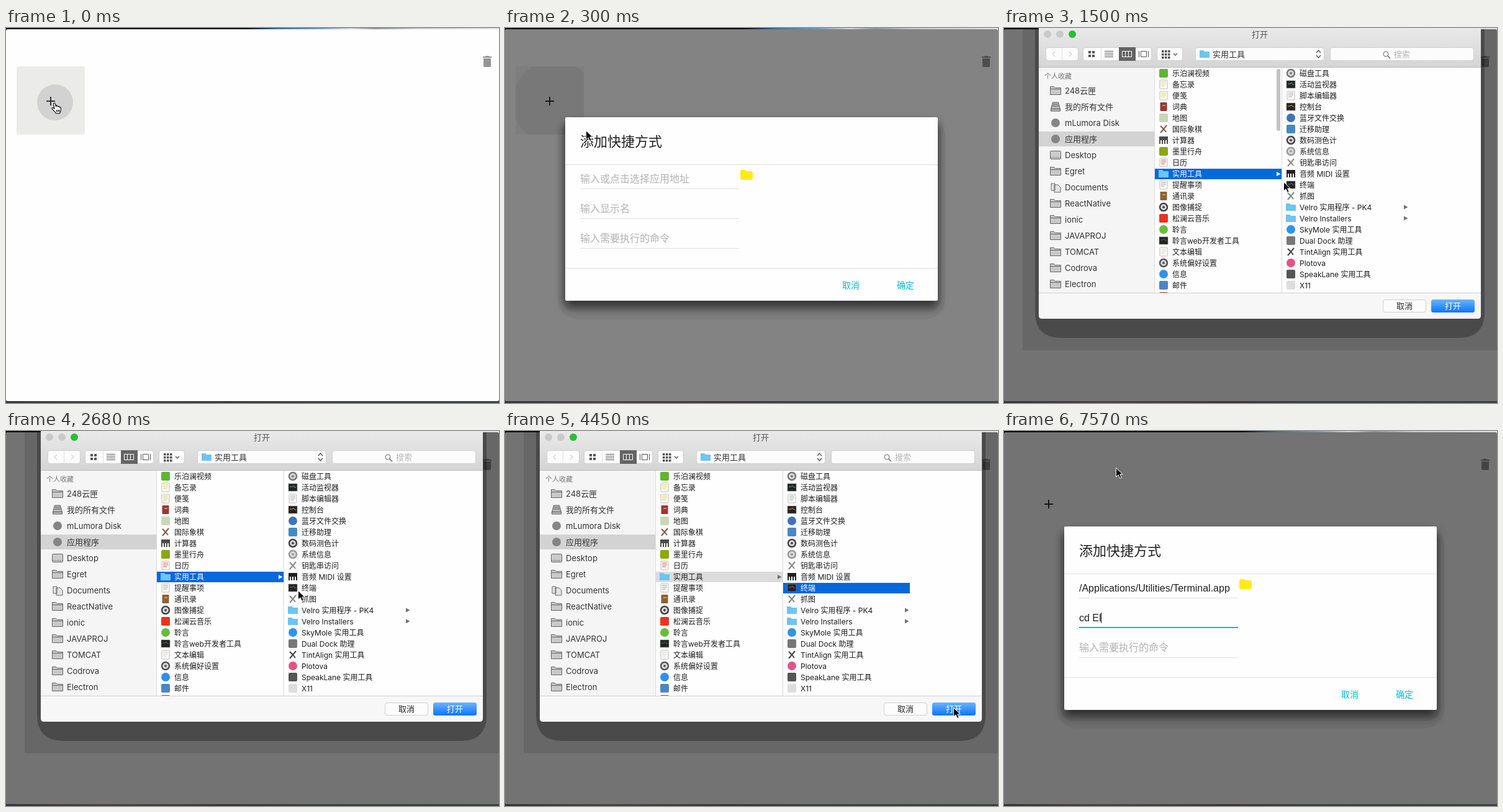
An HTML page that plays this animation: 794 px wide and 605 px high, repeating every 8000 ms.

```html
<!DOCTYPE html>
<html lang="zh-CN">
<head>
<meta charset="utf-8">
<title>添加快捷方式</title>
<style>
  html, body { margin: 0; width: 100%; height: 100%; overflow: hidden; background: #000; }
  svg { display: block; }
  text { font-family: Inter, "Noto Sans CJK SC", "Noto Sans CJK", sans-serif; white-space: pre; }
  .field { font: 16px "Liberation Sans", Arial, sans-serif; fill: #212121; }
  .hint { font-size: 16px; font-weight: 300; fill: #b2b2b2; }
  .mid { text-anchor: middle; }
</style>
</head>
<body>
<svg id="stage" width="794" height="605" viewBox="0 0 794 605">
  <defs>
    <linearGradient id="sky">
      <stop offset=".48" stop-color="#000"/><stop offset=".55" stop-color="#3f6896"/>
      <stop offset=".64" stop-color="#7d9cc0"/><stop offset=".7" stop-color="#d5d7da"/>
      <stop offset=".75" stop-color="#8d9298"/><stop offset=".83" stop-color="#c9cbce"/>
      <stop offset="1" stop-color="#e2e3e5"/>
    </linearGradient>
    <linearGradient id="ground">
      <stop offset="0" stop-color="#33343a"/><stop offset=".2" stop-color="#4a4145"/>
      <stop offset=".45" stop-color="#3b3539"/><stop offset=".6" stop-color="#3a3d42"/>
      <stop offset="1" stop-color="#3c3f43"/>
    </linearGradient>
    <linearGradient id="bar" x2="0" y2="1">
      <stop offset="0" stop-color="#e9e9e9"/><stop offset="1" stop-color="#d5d5d5"/>
    </linearGradient>
    <linearGradient id="blue" x2="0" y2="1">
      <stop offset="0" stop-color="#6ab4fb"/><stop offset="1" stop-color="#0c74fd"/>
    </linearGradient>
    <clipPath id="tileClip"><rect x="17" y="62" width="110" height="110" rx="2"/></clipPath>
    <clipPath id="listClip"><rect x="56" y="64" width="712" height="363"/></clipPath>
    <filter id="soft" x="-20%" y="-30%" width="140%" height="160%"><feGaussianBlur stdDeviation="8"/></filter>
  </defs>

  <rect width="794" height="4" fill="url(#sky)"/>
  <rect y="598" width="794" height="7" fill="url(#ground)"/>
  <rect y="2" width="794" height="600" rx="3" fill="#fefefe"/>

  <g id="tile" clip-path="url(#tileClip)">
    <rect x="17" y="62" width="110" height="110" fill="#ebebe9"/>
    <circle id="ripple" cx="79" cy="120" fill="#d2d2d2"/>
  </g>
  <path transform="translate(60 106)" d="M19 13h-6v6h-2v-6H5v-2h6V5h2v6h6v2z" fill="#333"/>
  <path transform="translate(763 42)" d="M6 19c0 1.1.9 2 2 2h8c1.1 0 2-.9 2-2V7H6v12zM19 4h-3.5l-1-1h-5l-1 1H5v2h14V4z" fill="#969696"/>
  <rect id="shade" y="2" width="794" height="600" rx="3"/>

  <g id="dialog">
    <rect x="-12" y="-2" width="624" height="328" rx="32" opacity=".045"/>
    <rect x="-6" y="4" width="612" height="310" rx="22" opacity=".06"/>
    <rect y="10" width="600" height="296" filter="url(#soft)" opacity=".6"/>
    <rect width="600" height="296" rx="2" fill="#fefefe"/>
    <path d="M0 76.5H600M0 243.5H600M24 115.5H280M24 163.5H280M24 211.5H280" stroke="#e0e0e0"/>
    <text x="24" y="47" font-size="22" font-weight="300" fill="#212121">添加快捷方式</text>
    <text id="pathHint" class="hint" x="24" y="105">输入或点击选择应用地址</text>
    <text id="path" class="field" x="24" y="105">/Applications/Utilities/Terminal.app</text>
    <text id="nameHint" class="hint" x="24" y="153">输入显示名</text>
    <text id="name" class="field" x="24" y="153"></text>
    <text class="hint" x="24" y="201">输入需要执行的命令</text>
    <rect id="focus" y="162" height="2" fill="#00bcd4"/>
    <rect id="caret" y="139" width="1" height="17" fill="#111"/>
    <path transform="translate(280 81)" d="M10 4H4c-1.1 0-1.99.9-1.99 2L2 18c0 1.1.9 2 2 2h16c1.1 0 2-.9 2-2V8c0-1.1-.9-2-2-2h-8l-2-2z" fill="#ffeb17"/>
    <rect id="hover" x="504" y="252" width="88" height="36" rx="2" fill="#ebebeb"/>
    <g font-size="14" fill="#00bcd4" class="mid">
      <text x="460" y="276">取消</text><text x="548" y="276">确定</text>
    </g>
  </g>

  <g id="sheet"></g>

  <g id="cursor">
    <path id="arrow" d="M.5 .5V15L4 11.8 6.6 17.4 9.2 16.2 6.7 10.9H11.2Z" fill="#000" stroke="#fff" stroke-width="1"/>
    <g id="hand" stroke="#000" stroke-width="1.1" stroke-linejoin="round">
      <path d="M1.5 2C1-.2 3.6-.8 4.3 1.3L5.6 6C6-.0 6 5 6.6 4.8 8 4.2 8.6 5 8.8 6.2 9.6 5.2 11 5.6 11.2 6.9 12.4 6.2 13.4 7 13.4 8.4L13.2 12 11.6 16.8H5.4C4.5 14.2 1.2 11.8-.6 9.6-1.6 8 .2 6.8 1.6 8.2L3 9.4Z" fill="#fff"/>
      <path d="M6.4 11v3.4M8.6 11v3.4M10.7 11v3.4" fill="none"/>
    </g>
    <path id="beam" d="M-3.5-8.5Q-.5-8.5 0-6.5 .5-8.5 3.5-8.5M0-6.5V6.5M-3.5 8.5Q-.5 8.5 0 6.5 .5 8.5 3.5 8.5M-2 2.5H2" fill="none" stroke="#000" stroke-width="1.2"/>
  </g>
</svg>
<script>
const $ = id => document.getElementById(id);
const show = (id, on) => { $(id).style.display = on ? '' : 'none'; };
const set = (id, attrs) => { for (const k in attrs) $(id).setAttribute(k, attrs[k]); };

// ---- file sheet ----
const rect = (x, y, w, h, fill, more = '') => `<rect x="${x}" y="${y}" width="${w}" height="${h}" fill="${fill}" ${more}/>`;
const line = (d, stroke, more = '') => `<path d="${d}" fill="none" stroke="${stroke}" ${more}/>`;
const label = (x, y, size, fill, s, more = '') => `<text x="${x}" y="${y}" font-size="${size}" fill="${fill}" ${more}>${s}</text>`;
const button = (x, w, y = 31, h = 22) => rect(x + .5, y + .5, w - 1, h - 1, '#fcfcfc', 'rx="3.5" stroke="#cfcfcf"');

// Small row icons centred on x, y.
const icons = {
  sq: (x, y, c) => rect(x - 7, y - 7, 14, 14, c, 'rx="2"'),
  dot: (x, y, c) => `<circle cx="${x}" cy="${y}" r="7" fill="${c}"/>`,
  screen: (x, y, c) => rect(x - 7, y - 6, 14, 12, '#222', 'stroke="#888" stroke-width=".6"') + line(`M${x - 5} ${y - 1}h4l2-2 2 3h2`, c),
  page: (x, y, c) => rect(x - 6, y - 7, 12, 14, '#fcfcfa', 'rx="1" stroke="#aaa" stroke-width=".8"') + line(`M${x - 4} ${y - 4}h8M${x - 4} ${y - 1}h8M${x - 4} ${y + 2}h6`, c),
  book: (x, y, c) => rect(x - 5.5, y - 7, 11, 14, c, 'rx="1"') + line(`M${x - 2} ${y - 2}h5`, '#e6d6bd'),
  ring: (x, y, c) => `<circle cx="${x}" cy="${y}" r="6" fill="#ddd" stroke="${c}" stroke-width="2.5"/><circle cx="${x}" cy="${y}" r="2" fill="${c}"/>`,
  tool: (x, y, c) => line(`M${x - 5} ${y + 6}L${x + 5} ${y - 6}M${x - 5} ${y - 5}l5 5 4 5`, c, 'stroke-width="2"'),
  keys: (x, y, c) => rect(x - 7, y - 6, 14, 12, c) + line(`M${x - 4} ${y}v6M${x} ${y}v6M${x + 4} ${y}v6`, '#fff', 'stroke-width="2"'),
  folder: (x, y, c) => `<path d="M${x - 8} ${y + 6}v-12h6l2 2h8v10z" fill="${c}"/>`,
  side: (x, y) => `<path d="M${x - 8.5} ${y + 6.5}v-13h6l2 2h9v11z" fill="#c9c9c9" stroke="#666"/>` + line(`M${x - 8} ${y - 2.5}h16`, '#666'),
  tray: (x, y) => `<path d="M${x - 7.5} ${y + 7}v-3l3-11h9l3 11v3z" fill="#bbb" stroke="#555"/>` + line(`M${x - 4} ${y - 4}h8M${x - 5} ${y - 1}h10M${x - 7} ${y + 3.5}h14`, '#555'),
  desk: (x, y) => rect(x - 8.5, y - 6.5, 17, 13, '#ccc', 'rx="1" stroke="#666"') + line(`M${x - 8} ${y + 4}h16`, '#666', 'stroke-dasharray="2 1"'),
  docs: (x, y) => `<path d="M${x - 7} ${y + 5}v-11h6v11z M${x - 2} ${y + 8}v-12h6l4 4v8z" fill="#e4e4e4" stroke="#666"/>`
};

const places = ['248云匣', '我的所有文件|tray', 'mLumora Disk|dot', '应用程序|dot', 'Desktop|desk', 'Egret', 'Documents|docs',
  'ReactNative', 'ionic', 'JAVAPROJ', 'TOMCAT', 'Codrova', 'Electron'];
const apps = ['乐泊澜视频|sq|#5fb62f', '备忘录|page|#edc84b', '便笺|page|#e3c13d', '词典|book|#98382f', '地图|sq|#c9d7b9',
  '国际象棋|tool|#7c5b43', '计算器|keys|#4a4a4a', '墨里行舟|sq|#8aa80f', '日历|page|#e2463c', '实用工具|folder|#6fc4f1',
  '提醒事项|page|#999', '通讯录|book|#8e6233', '图像捕捉|ring|#454545', '松澜云音乐|sq|#e8351f', '聆言|dot|#68bd3c',
  '聆言web开发者工具|screen|#3d7a55', '文本编辑|page|#ccc', '系统偏好设置|ring|#555', '信息|dot|#2f90ee', '邮件|sq|#4c86c2', '|sq|#e33b26'];
const tools = ['磁盘工具|ring|#777', '活动监视器|screen|#58b9a0', '脚本编辑器|page|#999', '控制台|screen|#d8a52e', '蓝牙文件交换|dot|#3e74b8',
  '迁移助理|sq|#4789c5', '数码测色计|ring|#444', '系统信息|ring|#999', '钥匙串访问|tool|#888', '音频 MIDI 设置|keys|#222', '终端|screen|#777',
  '抓图|tool|#7b8a80', 'Velro 实用程序 - PK4|folder|#6fc4f1', 'Velro Installers|folder|#6fc4f1', 'SkyMole 实用工具|dot|#2f94ea',
  'Dual Dock 助理|sq|#777', 'TintAlign 实用工具|tool|#444', 'Plotova|dot|#e5528a', 'SpeakLane 实用工具|sq|#555', 'X11|sq|#ddd'];

const column = (rows, x, id) => rows.map((row, i) => {
  const [name, kind, color] = row.split('|'), y = 73 + 18 * i;
  return icons[kind](x, i === 20 ? 433 : y, color) + label(x + 14, y + 4.5, 12, '#1c1c1c', name, `id="${id}${i}"`);
}).join('');
const triangle = (x, y, id = '') => `<path ${id} d="M${x} ${y - 3.5}l6.5 3.5-6.5 3.5z" fill="#707070"/>`;

const sidebar = places.map((row, i) => {
  const [name, kind = 'side'] = row.split('|'), y = 101 + 26 * i;
  return icons[kind](83, y, '#858585') + label(98, y + 4.8, 13, '#333', name);
}).join('');

const dots = (x, y, cols, rows, gap, size) => {
  let s = '';
  for (let i = 0; i < cols * rows; i++) s += rect(x + i % cols * gap, y + (i / cols | 0) * gap, size, size, '#555');
  return s;
};

$('sheet').innerHTML =
  rect(30, 2, 764, 518, '#000', 'opacity=".1"') +
  `<path d="M50 2H774V458Q774 500 732 500H92Q50 500 50 458Z" opacity=".28"/>` +
  `<path d="M56 0H768V464Q768 469 763 469H61Q56 469 56 464Z" fill="#f7f7f7"/>` +
  rect(56, 0, 712, 63, 'url(#bar)') + line('M56 63.5H768', '#bcbcbc') +
  [['70', '#c9c9c9'], ['90', '#c9c9c9'], ['110', '#26c035']].map(([x, c]) => `<circle cx="${x}" cy="10" r="6" fill="${c}"/>`).join('') +
  label(412, 15, 13, '#555', '打开', 'class="mid"') +
  button(67, 53) + line('M93.5 32V52', '#ddd') + line('M82 38l-4 4 4 4M105 38l4 4-4 4', '#bbb') +
  button(127, 111) + rect(185, 31, 27, 22, '#646464') + line('M156.5 32V52', '#ddd') +
  dots(136, 37, 2, 2, 6, 4) + line('M162 37.5h14M162 40.5h14M162 43.5h14M162 46.5h14', '#555') +
  line('M190.5 37.5h15v9h-15zM195.5 37.5v9M200.5 37.5v9', '#fff') +
  line('M220.5 37.5h9v9h-9zM217.5 37v10M232.5 37v10', '#555') +
  button(246, 42) + dots(254, 36, 3, 3, 5, 3.5) + line('M273 41l3 3 3-3', '#555', 'stroke-width="1.3"') +
  button(308, 208) + icons.folder(323, 42, '#6fc4f1') + label(336, 47, 13, '#333', '实用工具') +
  line('M503 40l3.5-4 3.5 4M503 44l3.5 4 3.5-4', '#555', 'stroke-width="1.4"') +
  button(525, 232) + `<circle cx="615" cy="42" r="4" fill="none" stroke="#666"/>` + line('M618 45l4 4', '#666', 'stroke-width="1.4"') +
  label(628, 47, 13, '#b5b5b5', '搜索') +
  rect(56, 64, 186, 363, '#f5f5f5') + rect(243, 64, 525, 363, '#fefefe') +
  line('M242.5 64V427M447.5 64V427', '#dadada') +
  label(65, 82, 11, '#777', '个人收藏', 'font-weight="500"') + rect(56, 167, 186, 24, '#d3d3d3') +
  rect(243, 227, 204, 17, '', 'id="pickA"') + rect(448, 245, 204, 17, '#0668dc', 'id="pickB"') +
  rect(439, 66, 6, 100, '#c2c2c2', 'rx="3" id="scroll"') +
  `<g clip-path="url(#listClip)">${sidebar}${column(apps, 257, 'a')}${column(tools, 462, 'b')}</g>` +
  triangle(439, 235.5, 'id="tri"') + triangle(644, 289) + triangle(644, 307) +
  line('M56 427.5H768', '#d0d0d0') +
  button(610, 70, 438, 21) + rect(688, 438, 70, 21, 'url(#blue)', 'rx="3.5"') +
  label(645, 453, 13, '#222', '取消', 'class="mid"') + label(723, 453, 13, '#fff', '打开', 'class="mid"');

// ---- time ----
const LOOP = 8000;
// Bursts of evenly spaced updates: start, end, count.
const bursts = [[0, 0, 1], [150, 1050, 7], [1350, 2390, 8], [2530, 3560, 8], [3710, 4740, 8], [4890, 5930, 8],
  [6070, 6520, 4], [6820, 6820, 1], [7270, 7270, 1], [7570, 7570, 1]];
const ticks = bursts.flatMap(([a, b, n]) => Array.from({ length: n }, (_, i) => Math.round((n > 1 ? a + (b - a) * i / (n - 1) : a) / 10) * 10));
const snap = t => ticks.filter(k => k <= t).pop();

const moves = [[0, 75, 121], [150, 77, 119], [300, 130, 165], [600, 500, 370], [750, 630, 424], [900, 632, 426],
  [1050, 388, 249], [1350, 388, 249], [1500, 450, 248], [2390, 450, 248], [2980, 490, 266], [3560, 487, 257], [3860, 487, 257],
  [4300, 722, 446], [4450, 722, 446], [4740, 417, 340], [5040, 384, 268], [5330, 228, 300], [5480, 216, 303],
  [5930, 216, 303], [6070, 208, 240], [6220, 188, 120], [6370, 180, 59]];
const shapes = [[0, 'hand'], [150, 'arrow'], [750, 'hand'], [1040, 'arrow'], [5180, 'beam'], [6220, 'arrow']];
const typed = [[0, ''], [6370, 'c'], [6520, 'cd'], [6820, 'cd '], [7270, 'cd E'], [7570, 'cd El']];
const latest = (list, t) => list.filter(k => k[0] <= t).pop()[1];
const clamp = v => Math.max(0, Math.min(1, v));
const ease = u => 1 - (1 - clamp(u)) ** 4;

function place(t) {
  const i = moves.findIndex(m => m[0] > t);
  if (i < 0) return moves[moves.length - 1].slice(1);
  const [t0, x0, y0] = moves[i - 1], [t1, x1, y1] = moves[i], u = (t - t0) / (t1 - t0);
  return [x0 + (x1 - x0) * u, y0 + (y1 - y0) * u];
}

function draw(time) {
  const t = snap(time);
  const open = t >= 1350 && t < 4590, picked = t >= 3710;

  set('ripple', { r: t < 150 ? 29 : 67 });
  set('tile', { opacity: clamp(1 - (t - 150) / 300) });
  set('shade', { opacity: .545 * ease((t - 131) / 400) });

  show('dialog', t >= 150 && !open);
  set('dialog', { transform: `translate(97 ${Math.round(90 + 64 * ease((t - 131) / 450))})` });
  set('hover', { opacity: t < 750 ? 0 : t < 1050 ? 1 : t < 1350 ? .52 : 0 });
  show('pathHint', t < 4590);
  show('path', t >= 4590);

  const word = latest(typed, t), grow = ease((t - 5580) / 450) * 256;
  $('name').textContent = word;
  show('nameHint', !word);
  show('caret', t >= 5630);
  set('caret', { x: Math.round(24 + (word ? $('name').getComputedTextLength() : 0) - .5) });
  set('focus', { x: 152 - grow / 2, width: grow });

  show('sheet', open);
  show('scroll', t < 2670);
  show('pickB', picked);
  set('pickA', { fill: picked ? '#dcdcdc' : '#0668dc' });
  set('a9', { fill: picked ? '#1c1c1c' : '#fff' });
  set('b10', { fill: picked ? '#fff' : '#1c1c1c' });
  set('tri', { fill: picked ? '#707070' : '#fff' });

  const [x, y] = place(t), shape = latest(shapes, t);
  for (const s of ['arrow', 'hand', 'beam']) show(s, s === shape);
  set('cursor', { transform: `translate(${Math.round(x)} ${Math.round(y)})` });
}

const start = performance.now();
function frame() {
  draw((performance.now() - start) % LOOP);
  requestAnimationFrame(frame);
}
frame();
</script>
</body>
</html>
```
